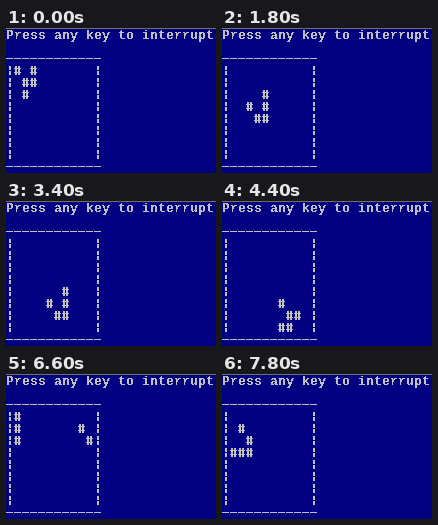
An HTML page that plays this animation: 210 by 145 pixels, repeating every 8 s.

```html
<!DOCTYPE html>
<html lang="en">
<head>
<meta charset="utf-8">
<title>Game of Life</title>
<style>
  html, body { margin: 0; width: 100%; height: 100%; overflow: hidden; background: #000080; }
  svg { display: block; width: 100%; height: 100%; fill: #c0c0c0; shape-rendering: crispEdges; }
  text { font: bold 13.333px "Liberation Mono", monospace; white-space: pre; filter: url(#hard-edges); }
</style>
</head>
<body>
<svg viewBox="0 0 210 145">
  <!-- Removes antialiasing, for a bitmap console look. -->
  <filter id="hard-edges" filterUnits="userSpaceOnUse" x="0" y="0" width="210" height="24"
          color-interpolation-filters="sRGB">
    <feComponentTransfer><feFuncA type="discrete" tableValues="0 1"/></feComponentTransfer>
  </filter>
  <rect width="210" height="1" fill="#716f64"/>
  <text x="0" y="11">Press any key to interrupt</text>
  <path id="border"/>
  <path id="cells"/>
</svg>
<script>
const COLS = 10, ROWS = 8, CELL_W = 8, CELL_H = 12;
const TOP_LINE = 2; // console line holding the upper border
const STEP = 200, STEPS = 40;

// Console characters as rectangles [x, y, width, height] in an 8 x 12 cell.
const GLYPHS = {
  '#': [[1, 2, 2, 9], [4, 2, 2, 9], [0, 4, 7, 1], [0, 8, 7, 1]],
  '|': [[3, 2, 2, 4], [3, 7, 2, 4]],
  '-': [[0, 6, 7, 1]]
};

const glyph = (char, col, line) => GLYPHS[char].map(([x, y, w, h]) =>
  `M${col * CELL_W + x} ${line * CELL_H + y}h${w}v${h}h${-w}z`).join('');

const range = n => Array.from({ length: n }, (_, i) => i);

function borderPath() {
  const bottom = TOP_LINE + ROWS + 1;
  const dashes = range(COLS + 2).map(c => glyph('-', c, TOP_LINE) + glyph('-', c, bottom));
  const bars = range(ROWS).map(r =>
    glyph('|', 0, TOP_LINE + 1 + r) + glyph('|', COLS + 1, TOP_LINE + 1 + r));
  return [...dashes, ...bars].join('');
}

const boardPath = board => board.map((row, r) => row.map((alive, c) =>
  alive ? glyph('#', c + 1, TOP_LINE + 1 + r) : '').join('')).join('');

// One generation of Life; the board wraps around at its edges.
function evolve(board) {
  const at = (r, c) => board[(r + ROWS) % ROWS][(c + COLS) % COLS];
  return board.map((row, r) => row.map((alive, c) => {
    let neighbours = -alive;
    for (const dr of [-1, 0, 1])
      for (const dc of [-1, 0, 1]) neighbours += at(r + dr, c + dc);
    return +(neighbours === 3 || (alive && neighbours === 2));
  }));
}

const glider = ['# #', ' ##', ' # '];
let board = range(ROWS).map(r => range(COLS).map(c => +(glider[r]?.[c] === '#')));
const paths = range(STEPS).map(() => {
  const path = boardPath(board);
  board = evolve(board);
  return path;
});

const cells = document.getElementById('cells');
document.getElementById('border').setAttribute('d', borderPath());

function draw() {
  cells.setAttribute('d', paths[Math.floor(performance.now() / STEP) % STEPS]);
  requestAnimationFrame(draw);
}
draw();
</script>
</body>
</html>
```
